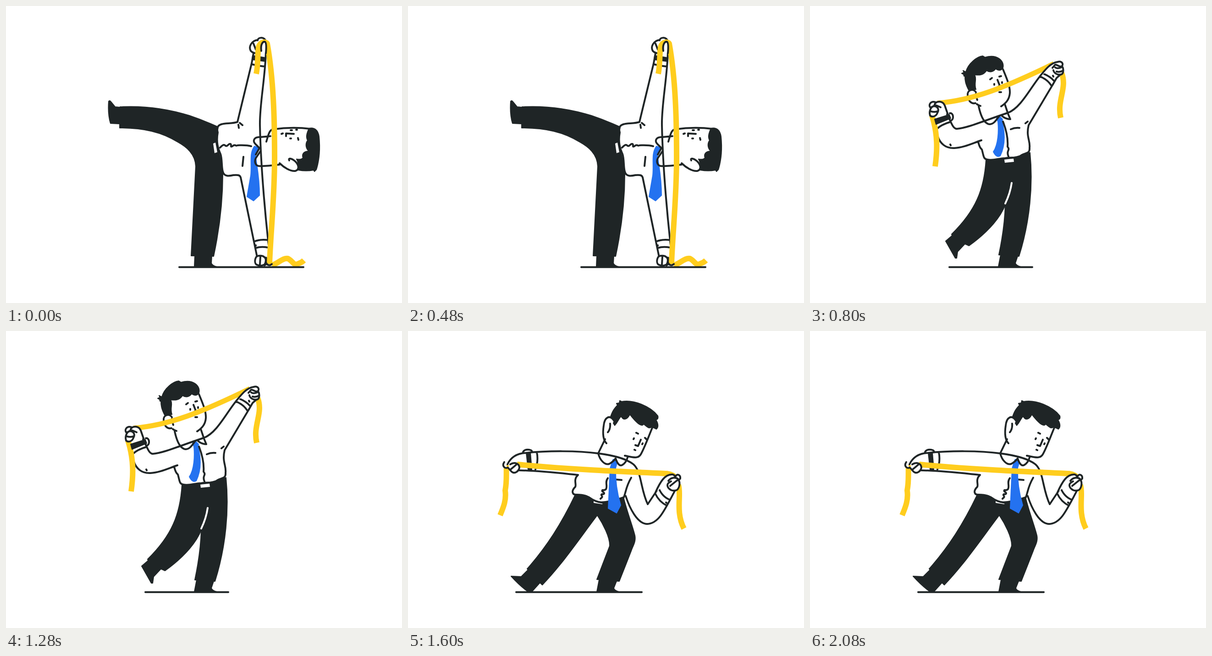
An HTML page for the animation above (2400 ms loop, 864 by 648 pixels).

```html
<!DOCTYPE html>
<html lang="en">
<head>
<meta charset="utf-8">
<title>Ribbon dance</title>
<style>
  html, body { margin: 0; width: 100%; height: 100%; overflow: hidden; background: #fff; }
  svg { display: block; width: 100vw; height: 100vh; }
  .pose { visibility: hidden; }
  path { fill: none; stroke: #1f2526; stroke-width: 4; stroke-linecap: round; stroke-linejoin: round; }
  .dark { fill: #1f2526; stroke-width: 2; }
  .tie { fill: #2472f0; stroke: #2472f0; stroke-width: 2; }
  .ribbon { stroke: #ffcd1e; stroke-width: 12; stroke-linecap: butt; }
  .white { fill: #fff; stroke: none; }
  .gap { stroke: #fff; }
  .hand { fill: #fff; }
</style>
</head>
<body>
<svg viewBox="0 0 864 648">
  <!-- Balancing on one leg -->
  <g class="pose">
    <path class="dark" d="M249 220C305 217 355 225 400 239Q430 249 463 264Q456 296 465 322Q470 342 473 366C473 430 465 490 453 546L404 545L414 350C413 322 393 307 375 297C340 275 300 266 248 266V257L228 256C223 240 223 222 224 208Q226 205 229 209L238 220L249 221ZM412 545L411 569H460Q450 566 448 561L449 545Z"/>
    <path class="white" d="M452 300L457 298L461 319L455 321Z"/>
    <path class="tie" d="M542 306L553 310L544 322C546 345 553 370 553 413L540 425L526 416L534 370C537 345 530 322 542 306Z"/>
    <path d="M540 103L536 125L505 253C493 257 480 255 470 258C460 261 460 268 462 276C458 298 463 312 468 323C472 335 470 352 473 361C476 373 487 371 496 369C507 368 510 369 512 374L548 548
      M567 98C566 155 553 215 554 260C556 360 568 480 575 540
      M536 127Q552 131 565 132M541 514Q556 508 573 511M545 528Q556 524 572 527M545 522L545 523
      M467 309C475 300 477 303 479 305C484 308 485 299 490 301C493 303 488 309 494 306C500 300 501 307 505 304Q525 303 535 306
      M518 329L516 349M507 259L508 266M510 255L516 260"/>
    <path d="M568 296C572 283 574 270 583 269Q625 263 664 268M577 284L555 286C540 285 538 295 544 301L553 310L545 324M555 317L545 332C541 341 545 348 551 349Q562 350 597 346M612 345L624 347"/>
    <path class="dark" d="M661 267C673 264 681 271 683 285C686 315 682 340 678 354L677 357L673 361L671 358Q655 361 638 358Q640 345 634 334Q645 336 648 331C644 321 654 315 662 318C653 311 653 300 658 293C653 285 658 274 661 267Z"/>
    <path class="hand" d="M597 343C606 352 620 361 631 360C642 357 638 345 630 338C624 333 615 330 618 337"/>
    <path d="M611 284V278L628 279M621 271H624M633 270H635M601 279L604 278M620 289H622M637 288L638 292"/>
    <path class="dark" d="M538 108L567 113L566 121L537 117Z"/>
    <path class="hand" d="M549 74C535 76 529 89 534 98Q539 103 546 103L552 84M540 82L545 95M549 75C550 68 562 67 566 75"/>
    <path class="hand" d="M552 545C543 544 541 560 546 564C553 568 565 567 566 560C570 548 560 544 552 545ZM555 547L554 564M566 549C573 549 570 563 564 566"/>
    <path class="ribbon" d="M546 148C551 124 548 96 552 87C556 78 567 77 570 82C584 160 586 250 586 330C586 420 577 500 575 563"/>
    <path class="ribbon" d="M580 566C595 561 604 549 615 551C626 556 627 568 638 562Q645 560 650 555"/>
    <path class="hand" d="M557 98C555 84 560 77 565 78C568 80 568 92 567 103"/>
    <path d="M568 561C570 566 576 567 580 563M378 569.7H649"/>
  </g>

  <!-- Arms spread, leaning back -->
  <g class="pose">
    <path class="dark" d="M384 336C408 337 440 334 480 320C487 390 480 470 456 546L412 543C419 510 425 470 426 434C417 458 393 490 347 523L338 519L322 536L320 550L317 550L296 513L310 501L309 498C362 446 380 400 384 336ZM416 543L411 569H460Q450 566 448 561L453 546Z"/>
    <path class="gap" d="M440 386Q437 408 426 431"/>
    <path class="white" d="M424 335L444 333L445 340L425 342Z"/>
    <path class="tie" d="M407 245L413 240L420 247L419 252C425 275 427 302 415 327Q407 332 400 318C411 302 412 272 410 252Z"/>
    <path d="M299 236C308 253 311 267 320 268C345 266 380 250 432 233C460 222 480 180 502 153
      M279 285C284 300 296 311 315 310C335 309 353 300 374 293M306 302L307 304
      M367 296C369 306 371 310 375 313C379 327 378 334 387 335C400 338 412 332 426 332C442 329 452 334 462 325C472 320 480 322 479 309C481 294 471 285 477 260L530 171
      M277 268Q286 259 306 253M502 154Q518 160 526 173M508 147Q525 154 532 163M530 152L531 154
      M421 252C430 275 432 295 431 307C438 315 427 315 433 328M438 269Q447 265 457 266M470 256L475 252"/>
    <path class="dark" d="M338 152L336 153L335 149L331 147L336 145L334 141L340 144C345 125 365 110 377 109L382 112C408 104 425 120 421 135C417 142 410 141 405 137C399 146 390 144 385 141C378 152 368 151 359 150C365 161 357 166 362 182L346 183C339 170 338 162 338 152Z"/>
    <path d="M421 138C428 155 437 175 436 190C435 205 426 213 417 219M364 214L367 216L372 218M368 219C373 242 380 257 392 258C401 258 407 248 412 241M425 214L432 235L437 247Q427 247 419 240"/>
    <path class="hand" d="M362 188C356 179 342 183 344 196C346 208 352 214 361 212"/>
    <path d="M362 191V194M364 202L365 205M393 160L397 157M413 154L417 153M409 161L414 174L411 176M402 170V172M419 166V168M413 188H417"/>
    <path class="ribbon" style="stroke-width:11" d="M278 212C355 206 425 178 532 126"/>
    <path class="ribbon" d="M266 239C279 280 278 315 273 350M549 146C562 180 538 205 547 244"/>
    <path class="dark" d="M272 247L304 237L307 245L275 258Z"/>
    <path d="M305 234C313 232 315 248 307 250"/>
    <path class="hand" d="M272 214C277 206 290 207 294 217L301 237M274 210C264 206 258 215 262 221C266 222 269 218 273 216M274 219C264 216 259 230 262 239C267 244 276 240 278 233C282 226 279 221 274 219ZM264 230Q271 232 278 230M276 217L285 221"/>
    <path class="hand" d="M502 153C514 138 525 124 540 122C550 119 554 127 549 132C543 133 540 128 535 128L529 135M550 131C554 137 553 147 549 149C540 152 532 146 531 140M535 134Q540 138 550 133M538 143Q545 145 552 141M546 150L538 157L530 171"/>
    <path d="M304 569.7H485"/>
  </g>

  <!-- Lunging forward -->
  <g class="pose">
    <path class="dark" d="M365 357Q386 358 404 370Q425 378 470 362C478 395 490 425 495 446C498 460 490 470 487 480L461 546L412 542L440 469C441 450 425 420 413 402C380 445 340 505 293 554L288 549L270 569H262Q243 555 225 535L247 536L262 521L260 519C303 470 335 420 365 357ZM417 543L412 569H460Q450 566 449 561L455 546Z"/>
    <path class="white" d="M405 370L425 375L424 378L405 375Z"/>
    <path d="M371 314C360 324 368 334 365 340C355 350 359 358 368 357C385 357 394 361 403 368Q417 376 438 375M463 375C477 360 471 347 487 320
      M217 291C224 276 238 267 257 266C305 261 370 261 415 267C445 271 474 277 492 291C510 307 507 345 523 378L547 342
      M242 304C290 305 340 311 371 314M475 360C483 385 500 421 522 421C546 420 558 395 582 349
      M281 264Q285 284 278 302M539 354Q548 373 565 381M547 343Q555 362 571 368M563 374L564 375
      M436 321C429 330 436 338 432 345C428 350 422 344 424 350C429 353 430 356 423 356C419 358 427 361 422 364L420 366M453 324L466 325"/>
    <path class="tie" d="M447 281L452 279L456 288L453 299C452 332 458 360 464 380L455 397L437 387L441 300L444 290Z"/>
    <path class="dark" d="M441 190C446 173 452 167 457 162L455 158L461 157L462 152L466 154C493 149 530 165 545 185Q547 192 541 194C546 201 547 210 542 214L532 209C525 215 521 208 514 203C510 211 497 199 484 182C477 196 469 194 465 186C459 192 458 199 451 206Z"/>
    <path class="hand" d="M449 195C440 182 429 188 427 206C424 226 427 239 433 245"/>
    <path d="M441 202Q442 214 436 221M430 236L415 267C419 283 430 293 439 290Q448 285 453 278C457 290 462 296 468 292Q476 287 479 276M533 211C525 230 516 255 508 269C502 280 489 275 473 272"/>
    <path d="M508 237L502 251L496 249M493 234L492 236M512 245L511 247M498 222L502 224M517 233L521 237M494 259L496 260"/>
    <path class="dark" d="M258 266L267 265L270 302L262 302Z"/>
    <path d="M251 264C254 257 270 257 271 264"/>
    <path class="ribbon" d="M238 291C350 302 470 307 565 311Q579 313 585 322"/>
    <path class="ribbon" d="M215 293C214 317 216 327 212 348C215 369 208 385 201 402M590 336C597 357 583 394 602 431"/>
    <path class="hand" d="M210 286C204 295 212 301 217 298M223 291C231 286 243 287 243 299C240 308 232 312 226 307L218 298M224 302L237 291"/>
    <path class="hand" d="M540 352C550 330 560 312 577 313Q582 314 583 319M584 317C586 311 595 313 594 322L590 326M568 327C574 319 585 318 590 324C595 332 592 347 583 348C573 350 566 342 566 336Q566 332 574 328M572 338L587 326"/>
    <path d="M236 569.7H510"/>
  </g>
</svg>
<script>
  const HOLD = 800;
  const poses = [...document.querySelectorAll('.pose')];

  function render() {
    const current = Math.floor(performance.now() / HOLD) % poses.length;
    poses.forEach((pose, i) => {
      pose.style.visibility = i === current ? 'visible' : 'hidden';
    });
    requestAnimationFrame(render);
  }
  render();
</script>
</body>
</html>
```
